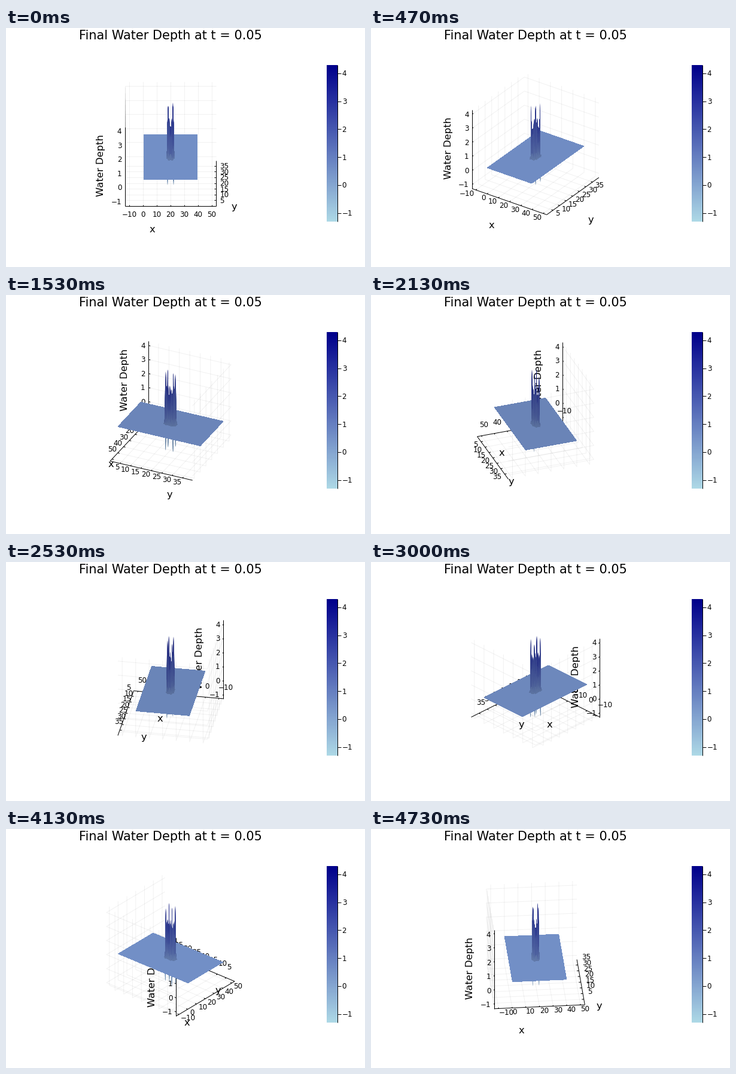
Recreate the animation shown at these times as a matplotlib script. Size 600x400 px, loop 4.79 s.

```python
import numpy as np
import matplotlib.pyplot as plt
from matplotlib.animation import FuncAnimation
from matplotlib.collections import LineCollection
from matplotlib.colors import LinearSegmentedColormap, to_rgb
from matplotlib.path import Path

FRAMES, LOOP_MS = 72, 4790
DPI = 100
CENTER = (275.0, 193.8)      # screen position of the middle of the box
HALF = 76                    # half the box edge in pixels
TILT = np.radians(30)
LIMITS = np.array([(-13.2, 53.2), (0.2, 39.8), (-1.3, 4.3)])
X_TICKS, Y_TICKS, Z_TICKS = range(-10, 51, 10), range(5, 36, 5), range(-1, 5)
REST = 0.56                  # level of the still water
STEEP = 0.86                 # steep faces catch less light
TITLE, GUIDE, TICK = 20.85, 16.4, 11.9
LIGHT, DARK = np.array(to_rgb("lightblue")), np.array(to_rgb("darkblue"))

plt.rcParams["font.family"] = "DejaVu Sans"
fig = plt.figure(figsize=(6, 4), dpi=DPI, facecolor="white")
ax = fig.add_axes([0, 0, 1, 1])
ax.set(xlim=(0, 600), ylim=(400, 0))
ax.axis("off")
ax.autoscale(False)

artists = []


def pt(px):
    return px * 72 / DPI


def number(v):
    return str(v).replace("-", "\u2212")


def text(x, y, s, px, ha="center"):
    """Text whose capitals are centred on y."""
    return ax.text(x, y + 0.365 * px, s, fontsize=pt(px), ha=ha, va="baseline")


def segments(lines, alpha=1):
    return ax.add_collection(LineCollection(
        lines, colors="black", alpha=alpha, linewidths=pt(1), zorder=2), autolim=False)


def water_colors(shade):
    return LinearSegmentedColormap.from_list("water", [LIGHT * shade, DARK * shade])


def water_depth():
    """Depth on the cells around the drop: a column with a jagged rim."""
    g = np.linspace(-3, 3, 16)
    x, y = np.meshgrid(g, g)
    r = np.hypot(x, y)
    rng = np.random.default_rng(4)
    rise = (1.95 + 0.15 * rng.uniform(-1, 1, r.shape)) / (1 + np.exp((r - 2.45) / 0.12))

    def put(px, py, value):
        rise[np.argmin(abs(g - py)), np.argmin(abs(g - px))] = value

    for sx in (-1, 1):
        for sy in (-1, 1):
            odd = sx < 0 < sy
            put(sx * 1.4, sy * 1.8, 2.3)
            put(sx * 1.0, sy * 2.2, 2.6)
            put(sx * 2.2, sy * 1.0, 2.6)
            put(sx * 1.8, sy * 1.8, 3.5 if odd else 3.74)
            put(sx * 2.2, sy * 1.8, -1.65 if odd else -1.84)
    return x + 20, y + 20, REST + rise


GRID_X, GRID_Y, DEPTH = water_depth()


def projector(az):
    c, s = np.cos(az), np.sin(az)

    def project(x, y, z):
        u, v, w = (2 * HALF * (np.asarray(q, float) - lo) / (hi - lo) - HALF
                   for q, (lo, hi) in zip((x, y, z), LIMITS))
        away = v * c - u * s
        return (CENTER[0] + u * c + v * s,
                CENTER[1] - w * np.cos(TILT) - away * np.sin(TILT))

    return project


def path(project, *points):
    return np.column_stack(project(*zip(*points)))


def tick_labels(project, spots, ticks):
    """Labels pushed outwards, at a right angle to the axis."""
    (x0, y0), (x1, y1) = spots[0], spots[-1]
    phi = (np.degrees(np.arctan2(y0 - y1, x1 - x0)) - 90) % 360
    phi = round(phi, 3) % 360
    dx, dy = 6.2 * np.cos(np.radians(phi)), -6.2 * np.sin(np.radians(phi))
    ha = "right" if 180 <= phi < 270 else "left"
    if phi in (90, 270):
        ha, dx, dy = "center", 0, 14 if phi == 270 else -19
    elif 0 < phi < 180:
        dx += 1.5 * np.cos(np.radians(phi)) - 1.5
        dy -= 12.5
    for (x, y), v in zip(spots, ticks):
        artists.append(text(x + dx, y + dy, number(v), TICK, ha))


def draw_box(project):
    (xa, xb), (ya, yb), (za, zb) = LIMITS
    grid = [path(project, (x, ya, za), (x, yb, za), (x, yb, zb)) for x in X_TICKS]
    grid += [path(project, (xb, y, za), (xa, y, za), (xa, y, zb)) for y in Y_TICKS]
    grid += [path(project, (xa, ya, z), (xa, yb, z), (xb, yb, z)) for z in Z_TICKS]
    artists.append(segments(grid, alpha=0.055))

    tx, ty = 0.022 * (xb - xa), 0.022 * (yb - ya)
    x_marks = [path(project, (x, ya, za), (x, ya + ty, za)) for x in X_TICKS]
    y_marks = [path(project, (xb, y, za), (xb - tx, y, za)) for y in Y_TICKS]
    z_marks = [path(project, (xa, ya, z), (xa, ya + ty, z)) for z in Z_TICKS]
    axes = [path(project, (xa, ya, za), (xb, ya, za)),
            path(project, (xb, ya, za), (xb, yb, za)),
            path(project, (xa, ya, za), (xa, ya, zb))]
    artists.append(segments(axes + x_marks + y_marks + z_marks))

    tick_labels(project, [m[0] for m in x_marks], X_TICKS)
    tick_labels(project, [m[0] for m in y_marks], Y_TICKS)
    for m, z in zip(z_marks, Z_TICKS):
        artists.append(text(m[0][0] - 5.6, m[0][1], number(z), TICK, "right"))

    mx, my, mz = (a.mean(axis=0) for a in axes)
    for (x, y), s, dx in ((mx, "x", -30.5), (my, "y", 30.5)):
        artists.append(ax.text(x + dx, y + 44.6, s, fontsize=pt(GUIDE), ha="center"))
    artists.append(ax.text(mz[0] - 40, mz[1] - 1.6, "Water Depth", fontsize=pt(GUIDE),
                           rotation=90, ha="center", va="center"))


def outline(px, py, keep):
    """Union of the kept cells, as triangles that all turn the same way."""
    p = np.stack([px, py], axis=-1)
    a, b, c, d = (q[keep] for q in (p[:-1, :-1], p[:-1, 1:], p[1:, 1:], p[1:, :-1]))
    tri = np.concatenate([np.stack([a, b, c], 1), np.stack([a, c, d], 1)])
    e, f = tri[:, 1] - tri[:, 0], tri[:, 2] - tri[:, 0]
    back = e[:, 0] * f[:, 1] < e[:, 1] * f[:, 0]
    tri[back] = tri[back, ::-1]
    closed = np.concatenate([tri, tri[:, :1]], axis=1)
    codes = [Path.MOVETO, Path.LINETO, Path.LINETO, Path.CLOSEPOLY]
    return Path(closed.reshape(-1, 2), np.tile(codes, len(tri)))


def draw_water(project, az):
    shade = 0.955 + 0.04 * np.cos(az + np.radians(25))
    lo, hi = LIMITS[2]
    # Far cells come first, so near ones cover them.
    order = (slice(None, None, -1 if np.cos(az) > 0 else 1),
             slice(None, None, 1 if np.sin(az) > 0 else -1))
    for limit, layer in ((np.minimum, 4), (np.maximum, 6)):
        z = limit(DEPTH, REST)[order]
        px, py = project(GRID_X[order], GRID_Y[order], z)
        moved = abs(z - REST) > 0.02
        keep = moved[:-1, :-1] | moved[:-1, 1:] | moved[1:, 1:] | moved[1:, :-1]
        mesh = ax.pcolormesh(px, py, z, shading="gouraud", cmap=water_colors(shade * STEEP),
                             vmin=lo, vmax=hi, zorder=layer)
        mesh.set_clip_path(outline(px, py, keep), ax.transData)
        artists.append(mesh)
    a, b = LIMITS[1]
    corners = path(project, (a, a, REST), (b, a, REST), (b, b, REST), (a, b, REST))
    artists.append(ax.add_patch(plt.Polygon(
        corners, facecolor=water_colors(shade)((REST - lo) / (hi - lo)),
        edgecolor="none", antialiased=False, zorder=5)))


def draw_fixed():
    text(275, 11, "Final Water Depth at t = 0.05", TITLE)
    ax.imshow(np.linspace(1, 0, 262)[:, None], cmap=water_colors(1), aspect="auto",
              extent=(536, 554, 324, 62), interpolation="nearest")
    ax.set(xlim=(0, 600), ylim=(400, 0))
    levels = [(v, 263 - 46.8 * v) for v in Z_TICKS]
    segments([[(553.6, 62), (553.6, 324)]] + [[(554, y), (559.5, y)] for _, y in levels])
    for v, y in levels:
        text(561.6, y, number(v), TICK, "left")


def draw(i):
    while artists:
        artists.pop().remove()
    az = 2 * np.pi * i / FRAMES
    project = projector(az)
    draw_box(project)
    draw_water(project, az)
    return artists


draw_fixed()
anim = FuncAnimation(fig, draw, frames=FRAMES, interval=LOOP_MS / FRAMES,
                     init_func=lambda: [], repeat=True, repeat_delay=0, blit=False)
plt.show()
```
